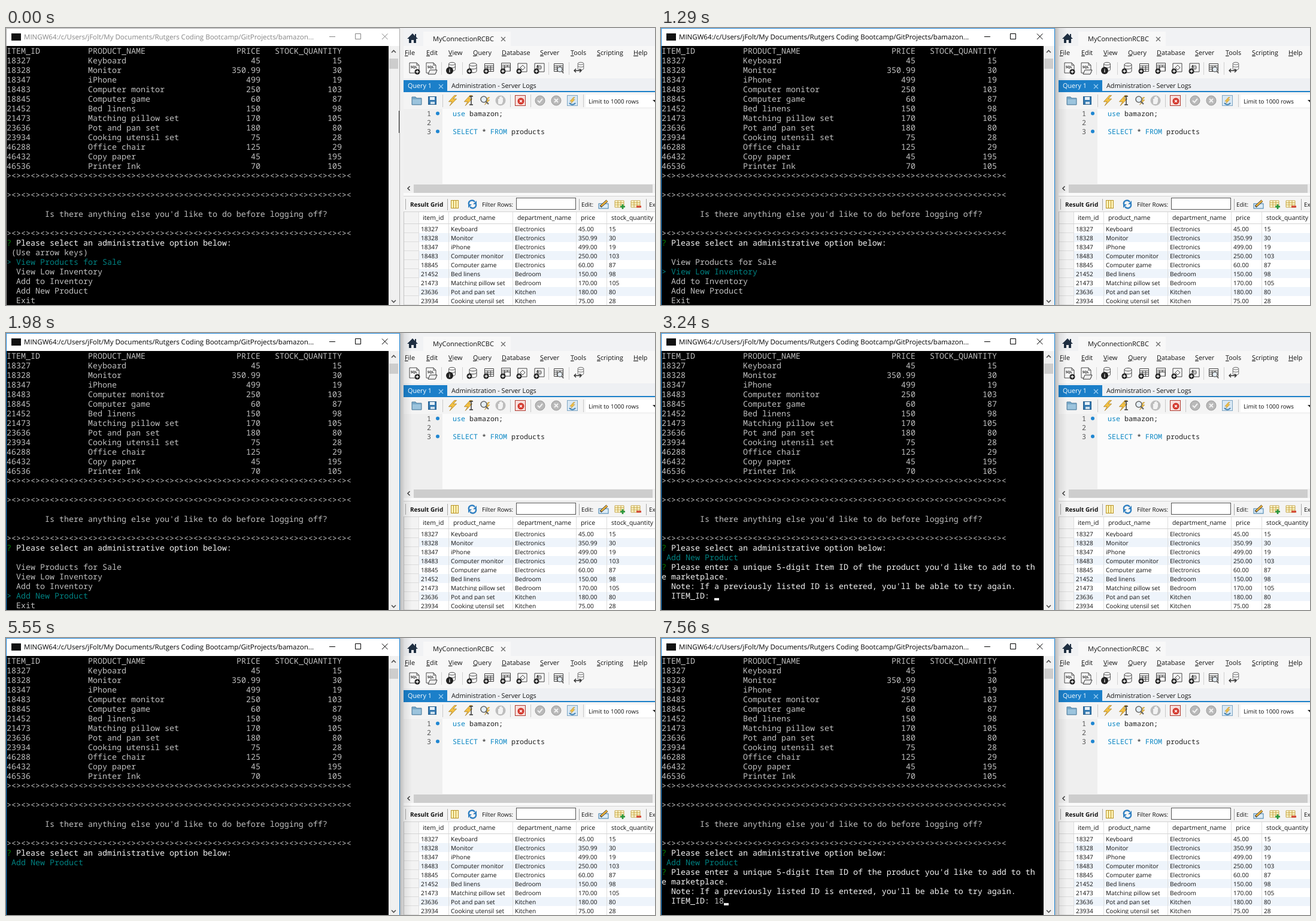
Recreate the animation shown at these times as an HTML page. Size 1084 px wide and 462 px high, loop 8000 ms.

```html
<!DOCTYPE html>
<html lang="en">
<head>
<meta charset="utf-8">
<title>Terminal and database client</title>
<style>
html, body { margin: 0; width: 100%; height: 100%; overflow: hidden; background: #f0f0f0; }
svg { display: block; }
text { white-space: pre; font-family: "Open Sans", "Noto Sans", sans-serif; font-size: 10.8px; fill: #111; text-rendering: geometricPrecision; }
.mono { font-family: "Noto Sans Mono", "DejaVu Sans Mono", monospace; font-size: 13.3333px; fill: #c0c0c0; }
.white { fill: #f4f4f4; }
.teal { fill: #008080; }
.green { fill: #008000; }
.code { font-family: "Noto Sans Mono", "DejaVu Sans Mono", monospace; font-size: 11.6667px; fill: #222; }
.kw { fill: #0b87c4; }
.title { font-size: 11.53px; }
.tab { font-size: 11px; }
.cell { font-size: 10.1px; }
.head { font-size: 10.4px; }
.bar { font-size: 9.8px; }
.bold { font-weight: 700; font-size: 10px; }
.tiny { font-size: 5.5px; font-weight: 700; }
.u { text-decoration: underline; }
</style>
</head>
<body>
<svg id="stage" width="1084" height="462" viewBox="0 0 1084 462">
  <defs>
    <linearGradient id="shade">
      <stop offset="0" stop-opacity=".22"/>
      <stop offset=".4" stop-opacity=".07"/>
      <stop offset="1" stop-opacity="0"/>
    </linearGradient>
    <g id="plus"><circle r="4.5" fill="#222"/><path d="M-2.5 0H2.5M0-2.5V2.5" stroke="#fff" stroke-width="1.3"/></g>
    <g id="db" fill="#fafafa" stroke="#444"><path d="M-6-6V5A6 2.5 0 0 0 6 5V-6"/><ellipse cy="-6" rx="6" ry="2.5"/><path d="M-6-1A6 2.5 0 0 0 6-1" fill="none"/></g>
    <g id="sheet" fill="#fafafa" stroke="#444"><path d="M-7.5-7.5H7.5V5.5H-7.5ZM-7.5-4H7.5M-7.5-1H7.5M-7.5 2H7.5M-2.5-4V5.5M2.5-4V5.5"/></g>
    <g id="page" fill="#fafafa" stroke="#444"><path d="M-8-9H4L8-5V8H-8ZM4-9V-5H8"/></g>
    <path id="bolt" d="M3-9L-7 2H-1L-5 9L7-3H1L7-9Z" fill="#f5c242" stroke="#a67a22" stroke-width=".8"/>
    <g id="lens"><circle r="5" fill="#e4eef6" stroke="#666" stroke-width="1.6"/><path d="M3.5 3.5L8 8" stroke="#666" stroke-width="2.2"/></g>
    <g id="grid" stroke="#b99324" stroke-width=".8" fill="#fff7d2"><path d="M-8-6H7V5H-8ZM-8-2.5H7M-8 1H7M-3-6V5M2-6V5"/></g>
  </defs>
</svg>
<script>
const LOOP = 8000;
const stage = document.getElementById('stage');
const rules = [];

const esc = s => String(s).replace(/&/g, '&amp;').replace(/</g, '&lt;');
const text = (x, y, s, cls = '', extra = '') => `<text x="${x}" y="${y}" class="${cls}" ${extra}>${esc(s)}</text>`;
const rect = (x, y, w, h, fill, extra = '') => `<rect x="${x}" y="${y}" width="${w}" height="${h}" fill="${fill}" ${extra}/>`;
const path = (d, stroke, extra = '') => `<path d="${d}" fill="none" stroke="${stroke}" ${extra}/>`;
const use = (id, x, y, scale = 1) => `<use href="#${id}" transform="translate(${x} ${y}) scale(${scale})"/>`;
const at = (x, y, body) => `<g transform="translate(${x} ${y})">${body}</g>`;

// Shows a group only during the given [start, end] spans, in ms.
function during(spans, body) {
  const name = 'show' + rules.length;
  let keys = '0% { opacity: 0 }';
  for (const [a, b] of spans) {
    keys += ` ${a / LOOP * 100}% { opacity: 1 }`;
    if (b < LOOP) keys += ` ${b / LOOP * 100}% { opacity: 0 }`;
  }
  const last = spans[spans.length - 1][1] < LOOP ? 0 : 1;
  rules.push(`@keyframes ${name} { ${keys} 100% { opacity: ${last} } }
    .${name} { animation: ${name} ${LOOP}ms step-end infinite }`);
  return `<g class="${name}">${body}</g>`;
}

const products = [
  [18327, 'Keyboard', 'Electronics', 45, 15],
  [18328, 'Monitor', 'Electronics', 350.99, 30],
  [18347, 'iPhone', 'Electronics', 499, 19],
  [18483, 'Computer monitor', 'Electronics', 250, 103],
  [18845, 'Computer game', 'Electronics', 60, 87],
  [21452, 'Bed linens', 'Bedroom', 150, 98],
  [21473, 'Matching pillow set', 'Bedroom', 170, 105],
  [23636, 'Pot and pan set', 'Kitchen', 180, 80],
  [23934, 'Cooking utensil set', 'Kitchen', 75, 28],
  [46288, 'Office chair', '', 125, 29],
  [46432, 'Copy paper', '', 45, 195],
  [46536, 'Printer Ink', '', 70, 105]
];

/* ---------- database client ---------- */

function header() {
  const menu = [['File', 666], ['Edit', 702], ['View', 739], ['Query', 780], ['Database', 828],
    ['Server', 892], ['Tools', 943], ['Scripting', 987], ['Help', 1048]];
  return rect(657, 0, 427, 462, '#f0f0f0') +
    rect(664, 0, 420, 30, '#f1f2f4') + rect(697, 6, 146, 24, '#f8f8f8') +
    '<path d="M670 18L679 9L688 18H685V25H681V20H677V25H673V18Z" fill="#1f2f42"/>' +
    rect(683, 10, 2, 5, '#1f2f42') +
    text(713, 22, 'MyConnectionRCBC', 'tab') +
    path('M827 15L834 22M834 15L827 22', '#666', 'stroke-width="1.2"') +
    rect(664, 30, 420, 54, '#f7f7f7') +
    during([[270, 300]], rect(979.5, 31.5, 59, 19, '#b3d7f3', 'stroke="#0078d7"')) +
    menu.map(([s, x]) => `<text x="${x}" y="45"><tspan class="u">${s[0]}</tspan>${s.slice(1)}</text>`).join('');
}

function mainTools() {
  const sql = text(-6, 0, 'SQL', 'tiny');
  const seps = [727.5, 762.5, 906.5, 940.5].map(x => `M${x} 57V78`).join('');
  return path(seps, '#d0d0d0') +
    at(682, 67, use('page', 0, 0) + sql + use('plus', 5, 6)) +
    at(710, 67, use('page', 0, 0) + sql + '<path d="M-5 10L-2 3H10L7 10Z" fill="#eee" stroke="#333"/>') +
    at(743, 67, use('db', 2, -2, .9) + '<circle cx="-2" cy="4" r="6" fill="#222"/>' + text(-3.2, 7, 'i', 'tiny', 'style="fill:#fff;font-size:8px"')) +
    at(778, 67, use('db', 2, 0) + use('plus', -4, 5)) +
    at(806, 67, use('sheet', 1, 0) + use('plus', -4, 5)) +
    at(834, 67, use('sheet', 1, -1) + rect(-1, -2, 9, 7, '#fafafa', 'stroke="#444"') + use('plus', -4, 5)) +
    at(861, 67, path('M-6-8H9V6H-6ZM2-5L6-1L2 3L-2-1Z', '#444') + use('plus', -4, 5)) +
    at(890, 67, path('M-7-8H9V6H-7Z', '#444') + text(-4, 1, 'f()', 'tiny', 'style="font-size:8px"') + use('plus', -4, 5)) +
    at(923, 67, use('sheet', 0, 0) + use('lens', 2, 2, .8)) +
    at(957, 67, use('db', 3, -3, .8) + path('M-8 4H4M1 1L4 4L1 7M-5 1L-8 4L-5 7', '#333', 'stroke-width="1.4"'));
}

function queryTabs() {
  return rect(664, 84, 420, 22, '#eef0f3') + rect(664, 87, 73, 19, '#1b7fc9') +
    rect(664, 105, 420, 2, '#1b7fc9') +
    text(671, 100, 'Query 1', '', 'style="fill:#fff"') +
    path('M723 94L730 101M730 94L723 101', '#9fd0f2', 'stroke-width="1.2"') +
    text(744, 100, 'Administration - Server Logs', '');
}

function queryTools() {
  const seps = [729.5, 842.5, 876.5, 964.5].map(x => `M${x} 111V132`).join('');
  const badge = mark => '<circle r="8" fill="#b9b9b9" stroke="#999"/>' + path(mark, '#f2f2f2', 'stroke-width="2"');
  return rect(664, 107, 420, 28, '#f4f4f4') + path(seps, '#c8c8c8') +
    at(686, 121, '<path d="M-8-6H-2L0-4H8V7H-8Z" fill="#78a9c9" stroke="#527f9d"/>' + rect(-7, -2, 14, 8, '#9cc4dd')) +
    at(712, 121, rect(-6.5, -6.5, 13, 13, '#3479b0', 'stroke="#235a88"') + rect(-4, -6, 8, 5, '#e6f0f7') + rect(-3, 2, 7, 4, '#cfe0ec')) +
    use('bolt', 746, 121, .95) + use('bolt', 772, 121, .95) +
    path('M774 114H780M777 114V128M774 128H780', '#333', 'stroke-width="1.4"') +
    use('bolt', 803, 122, .7) + use('lens', 798, 119, 1) +
    at(826, 121, '<circle r="8.5" fill="#bdbdbd"/><path d="M-4 5V-3H-2V-6H0V-7H2V-5H4V2L2 6H-3Z" fill="#f3f3f3"/>') +
    at(859, 121, rect(-8.5, -8.5, 17, 17, '#f7dfdc', 'stroke="#b13a30"') + '<circle cx="1" cy="1" r="5.5" fill="#d2352a"/>' + path('M-1-1L3 3M3-1L-1 3', '#fff', 'stroke-width="1.4"')) +
    at(892, 121, badge('M-4 0L-1 3L4-3')) + at(919, 121, badge('M-3-3L3 3M3-3L-3 3')) +
    at(946, 121, rect(-8.5, -8.5, 17, 17, '#d9e8f4', 'stroke="#7fa6c4"') + use('bolt', 0, 0, .6) + path('M-5 4A6 6 0 0 0 5 4', '#3f82b5', 'stroke-width="2"')) +
    rect(968, 111, 116, 21, '#fff') + text(973, 125.5, 'Limit to 1000 rows', 'bar') +
    '<path d="M1080 120H1088L1084 124Z" fill="#222"/>';
}

function editor() {
  const dot = y => `<circle cx="721" cy="${y}" r="3" fill="#1f86d1"/>`;
  return rect(664, 135, 420, 126, '#fbfbfb') + rect(664, 135, 65, 126, '#efefef') +
    [1, 2, 3].map(n => text(703, 132 + 15 * n, n, 'code', 'style="fill:#555"')).join('') + dot(142.5) + dot(172.5) +
    '<text x="746" y="147" class="code"><tspan class="kw">use</tspan> bamazon;</text>' +
    '<text x="746" y="177" class="code"><tspan class="kw">SELECT</tspan> * <tspan class="kw">FROM</tspan> products</text>' +
    rect(664, 260, 420, 15, '#f0f0f0') + rect(681, 261, 399, 14, '#cdcdcd') +
    path('M674.5 264L671 267.5L674.5 271', '#444', 'stroke-width="1.6"') +
    rect(664, 275, 420, 6, '#fafafa') + path('M664 280.5H1084', '#d4d4d4');
}

function resultTools() {
  const seps = [737.5, 957.5, 1069.5].map(x => `M${x} 285V304`).join('');
  return rect(664, 281, 420, 25, '#f4f4f4') + path('M667.5 285V303' + seps, '#a8a8a8') +
    text(675, 298, 'Result Grid', 'bold') +
    at(749, 294, rect(-5.5, -6.5, 12, 13, '#fff3b8', 'stroke="#b99324"') + path('M-1.5-6V6M2.5-6V6', '#b99324')) +
    at(779, 294, path('M-6 0A5.5 5.5 0 0 1 4-4M6 0A5.5 5.5 0 0 1-4 4', '#2f7fc1', 'stroke-width="2.4"') +
      '<path d="M7-6V0H1ZM-7 6V0H-1Z" fill="#2f7fc1"/>') +
    text(795, 298, 'Filter Rows:', 'bar') + rect(852.5, 283.5, 99, 19, '#fff', 'stroke="#555"') +
    text(961, 298, 'Edit:', 'bar') +
    at(998, 294, rect(-8, -1, 16, 8, '#dcecf7', 'stroke="#3c7cab"') + path('M-5 4L6-6', '#333', 'stroke-width="4"') + path('M-4 3L6-6', '#f0b53b', 'stroke-width="2.4"')) +
    at(1025, 294, use('grid', 0, 0) + path('M1 4H9M5 0V8', '#28963c', 'stroke-width="2.6"')) +
    at(1052, 294, use('grid', 0, 0) + path('M1 4H9', '#d2402f', 'stroke-width="3"')) +
    text(1074, 298, 'Export', 'bar');
}

function resultGrid() {
  const cols = [['item_id', 690], ['product_name', 740], ['department_name', 847], ['price', 953], ['stock_quantity', 1004]];
  let out = rect(664, 306, 420, 156, '#fff') + rect(665, 307, 24, 155, '#f3f3f3');
  cols.forEach(([s, x]) => out += text(x + (x > 690 ? 7 : 6), 320, s, 'head'));
  products.slice(0, 9).forEach((p, i) => {
    const y = 327 + 15 * i, bg = i % 2 ? '#eef4fb' : '#fff';
    const cells = [p[0], p[1], p[2], p[3].toFixed(2), p[4]];
    out += rect(690, y, 394, 15, bg);
    cells.forEach((c, k) => out += text(cols[k][1] + 3, y + 12, c, 'cell'));
    out += rect(690, y + 13, 394, 2, bg) + path(`M665 ${y + 14.5}H689`, '#dcdcdc');
  });
  const lines = cols.map(c => `M${c[1] - .5} 307V462`).join('');
  return out + path(lines, '#dedede') + path('M664 306.5H1084M664 326.5H1084', '#d4d4d4') + path('M664.5 306V462', '#c4c4c4');
}

/* ---------- terminal ---------- */

const put = (col, row, s, cls = '') => text(1 + 8 * col, 43 + 16 * row, s, 'mono ' + cls);
const right = (col, row, s) => put(col - String(s).length, row, s);

function frame(color, edge) {
  return text(30, 18.5, 'MINGW64:/c/Users/jFolt/My Documents/Rutgers Coding Bootcamp/GitProjects/bamazon...', 'title', `style="fill:${color}"`) +
    path('M540 14.5H550M583.5 9.5H592.5V18.5H583.5ZM628 9.5L637.5 19M637.5 9.5L628 19', color) +
    path('M.5 462V.5H657.5V462', edge);
}

function table() {
  const rule = '><'.repeat(36);
  let out = put(0, 0, 'ITEM_ID') + put(17, 0, 'PRODUCT_NAME') + put(48, 0, 'PRICE') + put(56, 0, 'STOCK_QUANTITY');
  products.forEach(([id, name, , price, qty], i) => {
    out += put(0, i + 1, id) + put(17, i + 1, name) + right(53, i + 1, price) + right(70, i + 1, qty);
  });
  return out + [13, 15, 19].map(r => put(0, r, rule)).join('') +
    put(8, 17, "Is there anything else you'd like to do before logging off?");
}

function menu(chosen) {
  const items = ['View Products for Sale', 'View Low Inventory', 'Add to Inventory', 'Add New Product', 'Exit'];
  return (chosen ? '' : put(1, 21, '(Use arrow keys)')) +
    items.map((s, i) => i === chosen ? put(0, 22 + i, '> ' + s, 'teal') : put(2, 22 + i, s)).join('');
}

function dialog() {
  const cursor = col => rect(1 + 8 * col, 442, 8, 4, '#e8e8e8');
  const ask = put(0, 20, '?', 'green') + put(2, 20, 'Please select an administrative option below:', 'white');
  const form = put(0, 22, '?', 'green') +
    put(2, 22, "Please enter a unique 5-digit Item ID of the product you'd like to add to th", 'white') +
    put(0, 23, 'e marketplace.', 'white') +
    put(2, 24, "Note: If a previously listed ID is entered, you'll be able to try again.", 'white') +
    put(2, 25, 'ITEM_ID:', 'white');
  const picks = [[0, 1260], [1290, 1680], [1710, 1950], [1980, 3240]];
  return during([...picks.slice(0, 3), [1980, LOOP]], ask) +
    picks.map((span, i) => during([span], menu(i))).join('') +
    during([[3240, LOOP]], put(1, 21, 'Add New Product', 'teal')) +
    during([[3240, 5550], [5580, LOOP]], form) +
    during([[5580, LOOP]], put(11, 25, '1')) +
    during([[5730, LOOP]], put(12, 25, '8')) +
    during([[3240, 3600], [4080, 4560], [5040, 5550]], cursor(11)) +
    during([[5580, 5730]], cursor(12)) +
    during([[5730, 6060], [6540, 7050], [7560, LOOP]], cursor(13));
}

function terminal() {
  return during([[720, LOOP]], rect(658, 0, 20, 462, 'url(#shade)')) +
    rect(0, 0, 658, 462, '#fff') + rect(1, 30, 638, 432, '#000') +
    rect(9, 9, 16, 12, '#111') +
    rect(639, 30, 18, 432, '#f0f0f0') + rect(640, 51, 15, 17, '#cdcdcd') +
    path('M644 41L647.5 37.5L651 41M644 454L647.5 457.5L651 454', '#505050', 'stroke-width="1.6"') +
    during([[0, 720]], frame('#858585', '#aaa') + rect(656, 138, 1, 37, '#333')) +
    during([[720, LOOP]], frame('#000', '#1883d7')) +
    table() + dialog();
}

const scene = header() + mainTools() + queryTabs() + queryTools() + editor() + resultTools() + resultGrid() + terminal();
const style = document.createElement('style');
style.textContent = rules.join('\n');
document.head.append(style);
stage.insertAdjacentHTML('beforeend', scene);
</script>
</body>
</html>
```
